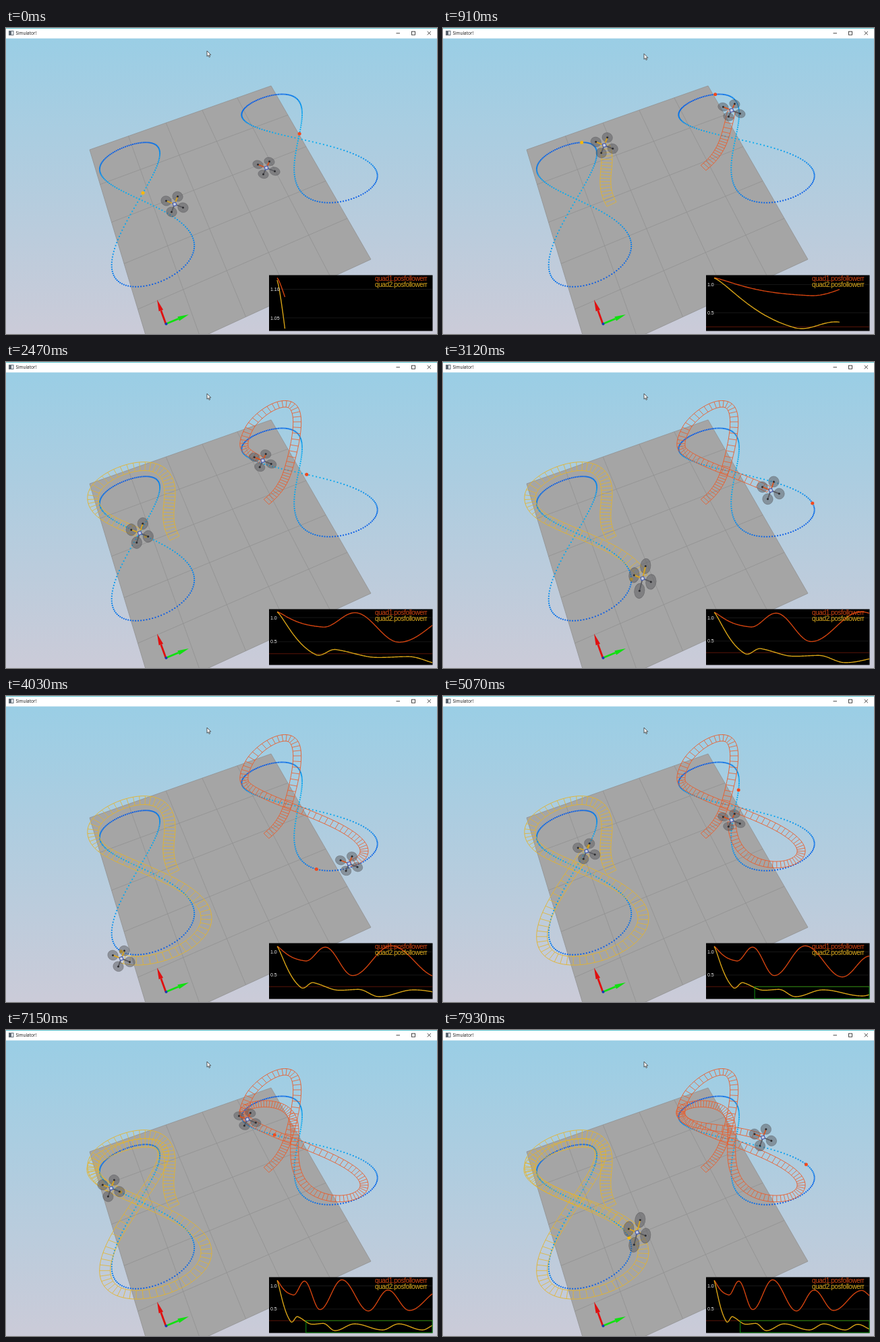
Animation of 639x455 px, one loop 8000 ms. Source, as an HTML page with a canvas:

```html
<!DOCTYPE html>
<html lang="en">
<head>
<meta charset="utf-8">
<title>Simulator!</title>
<style>
  html, body { margin: 0; width: 100%; height: 100%; overflow: hidden; background: #fff; }
  canvas, svg { position: absolute; left: 0; top: 0; width: 639px; height: 455px; }
  text { font-family: "Liberation Sans", Arial, sans-serif; }
  .title { font: 6.4px "Open Sans", sans-serif; }
  .legend { font-size: 10px; letter-spacing: -.4px; }
</style>
</head>
<body>
<canvas id="scene" width="639" height="455"></canvas>
<svg viewBox="0 0 639 455">
  <rect width="639" height="15.5" fill="#fff"/>
  <rect width="639" height="1" fill="#5cc4cf"/>
  <rect x="4.500" y="4.500" width="6.500" height="6" fill="#e8ecef" stroke="#69737c"/>
  <rect x="5" y="5" width="3" height="5" fill="#59646e"/>
  <text class="title" x="14.500" y="10.200" fill="#111">Simulator!</text>
  <g fill="none" stroke="#333" stroke-width=".9">
    <path d="M578.500 7.800h5.500M624.700 5l5.200 5.200m0-5.200l-5.200 5.200"/>
    <rect x="601.500" y="5.200" width="5" height="5"/>
  </g>
  <path id="cursor" d="M0 0v8.200l1.900-1.700 1.300 2.900 1.300-.6-1.300-2.800h2.600z" fill="#fff" stroke="#333" stroke-width=".8"/>
  <g class="legend">
    <text x="547" y="376" fill="#cf4412">quad1.posfollowerr</text>
    <text x="547" y="384.800" fill="#dfac1c">quad2.posfollowerr</text>
  </g>
  <g id="ticks" font-size="7" fill="#eee"></g>
</svg>
<script>
const LOOP = 8000, LAP = 4930, TURN = 2 * Math.PI;
const ctx = document.getElementById('scene').getContext('2d');
const cursor = document.getElementById('cursor');
const ticks = Array.from({ length: 6 }, () => {
  const el = document.createElementNS('http://www.w3.org/2000/svg', 'text');
  el.setAttribute('x', 392);
  return document.getElementById('ticks').appendChild(el);
});

// Cosine easing from one [time, value] key to the next
function swing(keys) {
  return t => {
    const i = keys.findIndex(k => k[0] > t);
    if (i < 1) return keys.at(i)[1];
    const [t0, a] = keys[i - 1], [t1, b] = keys[i];
    return a + (b - a) * (1 - Math.cos(Math.PI * (t - t0) / (t1 - t0))) / 2;
  };
}

// Perspective map of the square (1,1) (1,-1) (-1,-1) (-1,1) onto four corners
function plane(p, q, r, s) {
  const cross = (ax, ay, bx, by) => ax * by - ay * bx;
  const px = r[0] - p[0], py = r[1] - p[1], qx = s[0] - q[0], qy = s[1] - q[1];
  const det = cross(px, py, qx, qy);
  const f = cross(q[0] - p[0], q[1] - p[1], qx, qy) / det;
  const g = cross(q[0] - p[0], q[1] - p[1], px, py) / det;
  const w = [2 - 2 * f, 2 - 2 * g, 2 * f, 2 * g];
  const c = [p, q, r, s].map((v, i) => [v[0] * w[i], v[1] * w[i], w[i]]);
  const mix = signs => [0, 1, 2].map(k => c.reduce((sum, v, i) => sum + v[k] * signs[i], 0) / 4);
  const o = mix([1, 1, 1, 1]), U = mix([1, 1, -1, -1]), V = mix([1, -1, -1, 1]);
  return (u, v) => {
    const h = o.map((n, k) => n + U[k] * u + V[k] * v);
    return [h[0] / h[2], h[1] / h[2]];
  };
}

// Figure eight lying in a perspective plane
function eight(...corners) {
  const map = plane(...corners);
  return a => map(Math.SQRT2 * Math.sin(a), Math.sin(2 * a));
}

const floor = plane([393, 86], [124, 181], [218, 493], [541, 344]);

const quads = [
  {
    line: '#ea5c2a', arm: '#d9541f', dot: '#f2481c', plot: '#d2430f',
    course: eight([431, 105], [352, 136], [437, 243], [541, 202]),
    path: eight([417, 120], [355, 130], [443, 230], [520, 212]),
    phase: -.4, start: [386, 208], climb: [18, -50], wide: 6, tilt: [9.5, 4],
    fall: .35, fallTime: 350,
    level: swing([[0, .77], [740, .78], [1270, 1.1], [1990, .49], [3010, 1.13], [4240, .46],
      [5150, .91], [6150, .47], [7600, .9], [8200, .75]])
  },
  {
    line: '#e2b42e', arm: '#dba51c', dot: '#f6b90a', plot: '#d7a316',
    course: eight([227, 180], [139, 212], [157, 358], [277, 312]),
    path: eight([232, 178], [128, 209], [147, 363], [294, 317]),
    phase: 0, start: [250, 262], climb: [0, -14], wide: 8, tilt: [11.5, 7],
    fall: 1.036, fallTime: 400,
    level: swing([[0, .08], [620, .06], [960, .29], [1640, .17], [2140, .19], [2690, .035],
      [3600, .18], [4900, .05], [5650, .18], [6750, .05], [7400, .17], [8200, .05]])
  }
];

const climb = swing([[600, 0], [1350, 1], [2200, 0], [7150, 0], [8000, .45]]);
const cursorY = swing([[0, 34], [780, 38], [1960, 47]]);

const angle = (q, t) => t / LAP * TURN + q.phase;
const error = (q, t) => q.level(t) + q.fall * Math.exp(-((t / q.fallTime) ** 1.3));

// The quad starts off its path, lags while it speeds up and overshoots on the first lap
function flight(q, t) {
  const lag = t < 1820 ? 300 * Math.sin(Math.PI * t / 1820) : 0;
  const p = q.path(angle(q, t - lag)), home = q.path(q.phase);
  const away = Math.exp(-t / 450), up = climb(t);
  return p.map((v, k) => v + (q.start[k] - home[k]) * away + q.climb[k] * up);
}

function stroke(points, color, width = 1) {
  ctx.beginPath();
  points.forEach(p => ctx.lineTo(p[0], p[1]));
  ctx.strokeStyle = color;
  ctx.lineWidth = width;
  ctx.stroke();
}

function shape(points, color) {
  ctx.beginPath();
  points.forEach(p => ctx.lineTo(p[0], p[1]));
  ctx.closePath();
  ctx.fillStyle = color;
  ctx.fill();
}

function disc(x, y, r, color) {
  ctx.beginPath();
  ctx.arc(x, y, r, 0, TURN);
  ctx.fillStyle = color;
  ctx.fill();
}

function arrow(x, y, color) {
  const dx = x - 237, dy = y - 440, len = Math.hypot(dx, dy);
  const bx = 237 + dx * .55, by = 440 + dy * .55;
  const nx = -dy / len * 3.4, ny = dx / len * 3.4;
  stroke([[237, 440], [bx, by]], color, 2.8);
  shape([[x, y], [bx + nx, by + ny], [bx - nx, by - ny]], color);
}

function drawWorld() {
  const sky = ctx.createLinearGradient(0, 16, 0, 455);
  sky.addColorStop(0, '#9acee5');
  sky.addColorStop(1, '#cbcbd8');
  ctx.fillStyle = sky;
  ctx.fillRect(0, 0, 639, 455);
  shape([floor(1, 1), floor(1, -1), floor(-1, -1), floor(-1, 1)], '#a5a5a5');
  for (let k = -1; k < 1.1; k += .4) {
    stroke([floor(k, -1), floor(k, 1)], '#919191', .8);
    stroke([floor(-1, k), floor(1, k)], '#919191', .8);
  }
  arrow(224, 404, '#e01010');
  arrow(271, 426, '#10e010');
  disc(237.5, 440, 2, '#1838b8');
}

function drawCourse(q, t) {
  const dots = 190;
  for (let i = 0; i < dots; i++) {
    const a = i / dots * TURN, [x, y] = q.course(a), k = Math.cos(a) ** 2;
    ctx.fillStyle = `rgb(8,${90 + 85 * k},${230 + 10 * k})`;
    ctx.fillRect(x - .95, y - .95, 1.9, 1.9);
  }
  const [x, y] = q.course(t / LAP * TURN + .07);
  disc(x, y, 2.5, q.dot);
}

// Ribbon across the direction of flight
function drawTrail(q, t) {
  if (t === 0) return;
  const left = [], right = [];
  for (let s = 0; s <= t; s += 25) {
    const [x, y] = flight(q, s), [x0, y0] = flight(q, s - 8), [x1, y1] = flight(q, s + 8);
    const k = q.wide / Math.hypot(x1 - x0, y1 - y0);
    const hx = (y0 - y1) * k, hy = (x1 - x0) * k * .8;
    left.push([x - hx, y - hy]);
    right.push([x + hx, y + hy]);
    if (s % 50 === 0) stroke([left.at(-1), right.at(-1)], q.line, .8);
  }
  stroke(left, q.line, .9);
  stroke(right, q.line, .9);
}

function drawQuad(q, t) {
  const [x, y] = flight(q, t);
  const lean = Math.max(0, Math.cos(angle(q, t) - 3.9)) ** 3;
  const ax = -12.5, ay = -5, bx = 4.5, by = -q.tilt[0] - q.tilt[1] * lean;
  const hubs = [[-ax, -ay], [-bx, -by], [ax, ay], [bx, by]];
  ctx.save();
  ctx.translate(x, y);
  ctx.save();
  ctx.transform(ax, ay, bx, by, 0, 0);
  [[1, 0], [0, 1], [-1, 0], [0, -1]].forEach(([u, v]) => {
    disc(u, v, .58, 'rgba(92,92,96,.52)');
    ctx.lineWidth = .05;
    ctx.strokeStyle = 'rgba(80,80,84,.5)';
    ctx.stroke();
  });
  ctx.restore();
  hubs.forEach((h, i) => stroke([[0, 0], h], i < 2 ? '#5b5b60' : q.arm, 1.8));
  hubs.forEach(h => disc(h[0], h[1], 1.5, '#2c2c30'));
  ctx.rotate(-.35);
  ctx.fillStyle = '#4a5fae';
  ctx.fillRect(-3, -3, 6, 6);
  ctx.fillStyle = '#c9d0e4';
  ctx.fillRect(-1.8, -1.8, 3.6, 3.6);
  ctx.restore();
}

function drawPlot(t) {
  const now = t + 60, span = Math.max(now, 1200);
  const curves = quads.map(q => {
    const pts = [];
    for (let s = 0; s <= now; s += 10) pts.push([s, error(q, s)]);
    return pts;
  });
  const all = curves.flat().map(p => p[1]);
  const max = Math.max(...all), min = Math.min(...all), range = max - min;
  const px = s => 402 + s / span * 230;
  const py = v => 371.5 + (max - v) / range * 75.5;

  ctx.fillStyle = '#000';
  ctx.fillRect(390, 367.5, 242.5, 83);

  const step = range < .15 ? .05 : range < .3 ? .1 : range < .6 ? .2 : .5;
  let v = Math.floor(max / step) * step;
  ticks.forEach(el => {
    const show = v > min + .02 * range;
    el.textContent = show ? v.toFixed(step < .1 ? 2 : 1) : '';
    if (show) {
      el.setAttribute('y', py(v) + 2.5);
      stroke([[402, py(v)], [632, py(v)]], '#222', .7);
    }
    v -= step;
  });

  const limit = py(.25);
  if (limit < 448) stroke([[390, limit], [632, limit]], '#65180b', .9);
  curves.forEach((pts, i) => stroke(pts.map(p => [px(p[0]), py(p[1])]), quads[i].plot, 1.4));
  if (t >= 4340) {
    const x = px(1340);
    ctx.strokeStyle = '#128f12';
    ctx.lineWidth = 1;
    ctx.strokeRect(x, limit, 632 - x, 450 - limit);
  }
}

// The picture advances in short steps
function snap(t) {
  if (t < 100) return 0;
  const [from, step] = t < 780 ? [100, 113.34] : [780, 130];
  return from + Math.floor((t - from) / step) * step;
}

let shown = -1;
function tick() {
  const t = snap(performance.now() % LOOP);
  if (t !== shown) {
    shown = t;
    drawWorld();
    [drawCourse, drawTrail, drawQuad].forEach(draw => quads.forEach(q => draw(q, t)));
    drawPlot(t);
    cursor.setAttribute('transform', `translate(298 ${cursorY(t)})`);
  }
  requestAnimationFrame(tick);
}
tick();
</script>
</body>
</html>
```
